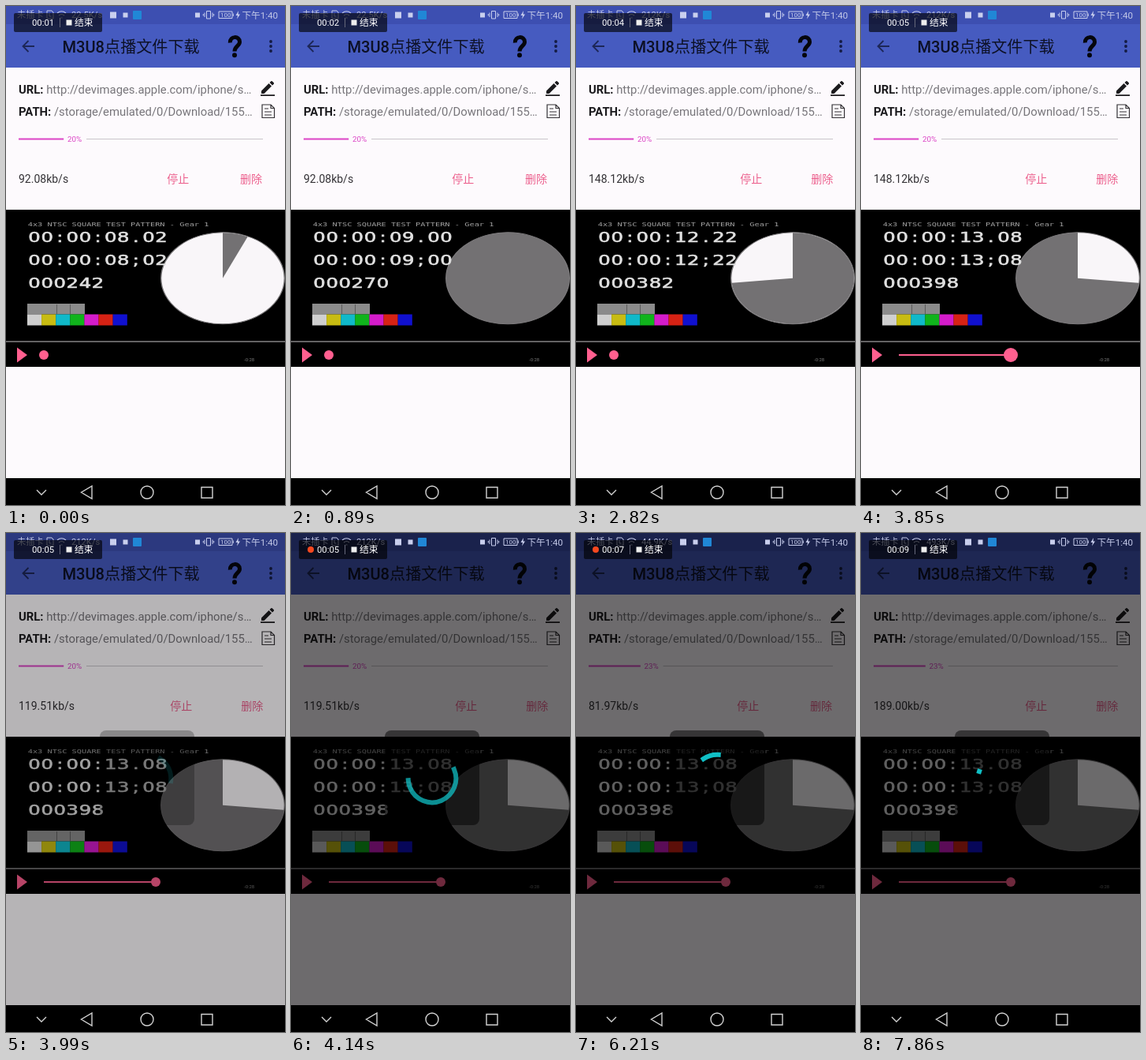
Recreate the animation shown at these times as an HTML page. Size 354 by 632 pixels, loop 8000 ms.

```html
<!DOCTYPE html>
<html lang="zh">
<head>
<meta charset="utf-8">
<style>
html, body { margin: 0; width: 100%; height: 100%; overflow: hidden; background: #fdfafd; }
svg { display: block; width: 100%; height: 100%; }
text { font-family: Roboto, "Noto Sans CJK SC", "Noto Sans CJK", sans-serif; white-space: pre; }
.field { font-size: 14.85px; fill: #77757a; }
.field tspan { font-weight: 700; fill: #1b1a1d; }
.button { font-size: 14px; font-weight: 500; fill: #ec5f8d; }
.status { font-size: 11.2px; fill: #c3c9e8; }
.digits { font: 18px "DejaVu Sans", sans-serif; fill: #e0e0e0; stroke: #e0e0e0; stroke-width: .6; text-anchor: middle; }
.caption { font: 7.65px "DejaVu Sans Mono", monospace; fill: #a0a0a0; }
.soft { filter: blur(.5px); }
.line { fill: none; stroke-width: 1.4; }
</style>
</head>
<body>
<svg viewBox="0 0 354 632">
  <rect width="354" height="632" fill="#fdfafd"/>
  <rect width="354" height="78" fill="#465bc0"/>
  <rect width="354" height="23" fill="#3d4fb1"/>

  <!-- Toolbar -->
  <path class="line" d="M36 51H21.5M28.5 44L21.5 51L28.5 58" stroke="#1d2757" style="stroke-width:1.8"/>
  <text x="71.5" y="58.5" font-size="20.1" font-weight="500" fill="#0d1126">M3U8点播文件下载</text>
  <path d="M284.3 46.5C283.8 37.5 296.5 37.5 296.5 45.5C296.5 50.5 290 51 290 57.5" fill="none" stroke="#05060c" stroke-width="5"/>
  <circle cx="290" cy="62.3" r="3" fill="#05060c"/>
  <g fill="#141b42"><circle cx="336" cy="45" r="1.9"/><circle cx="336" cy="51" r="1.9"/><circle cx="336" cy="57" r="1.9"/></g>

  <!-- Task details -->
  <text class="field" x="16" y="110.6"><tspan>URL: </tspan>http://devimages.apple.com/iphone/s…</text>
  <text class="field" x="16" y="138.6"><tspan>PATH: </tspan>/storage/emulated/0/Download/155…</text>
  <path d="M324 111V107.5L333.5 98L337 101.5L327.5 111ZM334.5 97L336.3 95.2Q337 94.7 337.7 95.2L339.8 97.3Q340.3 98 339.8 98.7L338 100.5ZM323 112.3H341V114H323Z" fill="#1b1a1d"/>
  <path class="line" d="M325 125H336L340.5 129.5V141.5H325ZM336 125V129.5H340.5M328 130H333M328 134H337M328 138H337" stroke="#333135" style="stroke-width:1.2"/>
  <path id="rest" stroke="#c9c5ca" stroke-width="1"/>
  <path id="done" stroke="#dc45c6" stroke-width="2"/>
  <text id="percent" y="171.8" font-size="9.8" fill="#dc45c6"></text>
  <text id="speed" x="16" y="223.8" font-size="14" fill="#343236"></text>
  <text id="stop" class="button" y="223.8">停止</text>
  <text id="remove" class="button" y="223.8">删除</text>

  <!-- Video, shown wider than it was shot -->
  <rect y="258" width="354" height="199" fill="#000"/>
  <g class="soft">
    <g transform="scale(1.35 1)">
      <text class="caption" x="20.5" y="278.8">4x3 NTSC SQUARE TEST PATTERN - Gear 1</text>
      <circle id="disc" cx="203.7" cy="344.8" r="58" stroke="#7b797b" stroke-width="1"/>
      <path id="wedge"/>
      <text id="code1" class="digits" y="299.4"></text>
      <text id="code2" class="digits" y="328.4"></text>
      <text id="count" class="digits" y="357.2"></text>
    </g>
    <rect x="27" y="377" width="73" height="13.5" fill="#8b8b8b"/>
    <path d="M64.5 378V390M81.5 378V390" stroke="#5c5c5c"/>
    <g id="bars"></g>
  </g>
  <path d="M0 425H354" stroke="#858385" stroke-width="1.6"/>
  <path d="M14 432.5L27 442L14 451.5Z" fill="#ff5f8f"/>
  <path id="track" stroke="#ff5f8f" stroke-width="2"/>
  <circle id="thumb" cy="442" fill="#ff5f8f"/>
  <text x="302" y="450" font-size="6" fill="#777">-0:28</text>

  <!-- Loading dialog -->
  <rect id="dim" width="354" height="598" fill="#000"/>
  <g id="dialog">
    <rect x="119" y="250" width="120" height="120" rx="8" fill-opacity=".5"/>
    <circle id="spinner" cx="179" cy="311" r="30.3" pathLength="360" fill="none" stroke="#10bfc5" stroke-width="6" stroke-linecap="square"/>
  </g>

  <!-- Status bar -->
  <text class="status" x="14" y="15.3">未插卡</text>
  <path class="line" d="M52 6H58L60 8V16H52ZM55 9V13H57.5" stroke="#c3c9e8" style="stroke-width:1"/>
  <path class="line" d="M65 9Q70.5 4.5 76 9M67 12Q70.5 9 74 12M69.5 15H71.5" stroke="#c3c9e8" style="stroke-width:1.2"/>
  <text id="net" class="status" x="83" y="15.3"></text>
  <g fill="#c9cfee">
    <rect x="132" y="7.5" width="8" height="8"/>
    <rect x="148.5" y="8.5" width="6" height="6"/>
    <rect x="240" y="8.5" width="6" height="6"/>
    <path d="M295 6L291.5 12H294L293 16.5L297 10.5H294.5Z"/>
  </g>
  <rect x="161" y="6" width="11" height="11" rx="1" fill="#2087d6"/>
  <path class="line" d="M254.5 6.5H259.5V16H254.5ZM252 8.5V14M262 8.5V14M250.3 10V12.5M263.7 10V12.5" stroke="#c9cfee" style="stroke-width:1"/>
  <path class="line" d="M270 7H287V15.5H270ZM288.3 9.5V13" stroke="#c9cfee" style="stroke-width:1"/>
  <text x="272" y="14.3" font-size="8" fill="#c9cfee">100</text>
  <text class="status" x="299.5" y="15.6" style="font-size:11.6px">下午1:40</text>

  <!-- Recorder badge -->
  <rect x="10" y="9" width="112" height="24" rx="2" fill="#000" fill-opacity=".64"/>
  <circle id="dot" cx="25" cy="21" r="4" fill="#f5481f"/>
  <text id="clock" x="33" y="25.2" font-size="11.3" fill="#fff"></text>
  <path d="M68.5 15V27" stroke="#66687a"/>
  <rect x="76.5" y="17.5" width="7" height="7" fill="#eee"/>
  <text x="87" y="25.2" font-size="11.8" fill="#fff">结束</text>

  <!-- Navigation bar -->
  <rect y="598" width="354" height="34" fill="#000"/>
  <path class="line" d="M39 613L45 619L51 613M109 608V624L95.5 616ZM248 609.5H262V623H248ZM187 616A8 8 0 1 1 171 616A8 8 0 1 1 187 616" stroke="#d2d2d2"/>
</svg>
<script>
const LOOP = 8000, TICK = 148.1;
const FPS = 30, PAUSED = 398;
const WHITE = '#f9f6f9', GREY = '#737173';

const speeds = [[0, '92.08'], [1330, '114.29'], [2220, '148.12'], [3990, '119.51'], [6000, '81.97'], [6900, '189.00']];
const rates = [[0, '22.5K/s'], [2220, '212K/s'], [5100, '44.9K/s'], [7700, '493K/s']];
const progress = [[0, 20], [5200, 23]];

const el = id => document.getElementById(id);
const set = (id, attrs) => { for (const k in attrs) el(id).setAttribute(k, attrs[k]); };
const write = (id, text) => { el(id).textContent = text; };
const pad = (n, size = 2) => String(n).padStart(size, '0');
const clamp = x => Math.min(1, Math.max(0, x));
const latest = (list, t) => list.filter(([start]) => start <= t).pop()[1];

// cubic-bezier(.4, 0, .2, 1)
function ease(x) {
  x = clamp(x);
  let lo = 0, hi = 1;
  for (let i = 0; i < 24; i++) {
    const s = (lo + hi) / 2, r = 1 - s;
    if (1.2 * s * r * r + .6 * s * s * r + s ** 3 < x) lo = s; else hi = s;
  }
  return lo * lo * (3 - 2 * lo);
}

function writeDigits(id, text) {
  write(id, text);
  set(id, { x: [...text].map((_, i) => 26.7 + 11.93 * i).join(' ') });
}

function videoFrame(t) {
  if (t < 2200) return Math.round(242 + Math.min(t, 1930) * .0319);
  return Math.min(PAUSED, Math.round(382 + (t - 2820) * FPS / 1000));
}

function drawVideo(t) {
  const n = videoFrame(t), sec = Math.floor(n / FPS), part = n % FPS;
  writeDigits('code1', `00:00:${pad(sec)}.${pad(part)}`);
  writeDigits('code2', `00:00:${pad(sec)};${pad(part)}`);
  writeDigits('count', pad(n, 6));

  const colors = sec % 2 ? [GREY, WHITE] : [WHITE, GREY];
  const a = 2 * Math.PI * part / FPS, cx = 203.7, cy = 344.8, r = 57.6;
  set('disc', { fill: colors[0] });
  set('wedge', {
    fill: colors[1],
    d: `M${cx} ${cy}V${cy - r}A${r} ${r} 0 ${+(part > FPS / 2)} 1 ${cx + r * Math.sin(a)} ${cy - r * Math.cos(a)}Z`
  });
}

function drawTask(t) {
  const p = latest(progress, t), end = 16 + p * 2.86;
  set('done', { d: `M16 168.5H${end}` });
  set('percent', { x: end + 4.8 });
  write('percent', p + '%');
  set('rest', { d: `M${end + 28.8} 168.5H326` });

  const speed = latest(speeds, t), wide = speed.length > 5;
  write('speed', speed + 'kb/s');
  set('stop', { x: wide ? 208.3 : 204.3 });
  set('remove', { x: wide ? 298.3 : 297 });
}

function drawSeek(t) {
  const x = 48 + 142 * ease((t - 3200) / 550);
  set('track', { d: `M48 442H${x}` });
  set('thumb', { cx: x, r: t > 3150 && t < 3950 ? 9 : 6 });
}

function drawDialog(t) {
  const shown = clamp((t - 3900) / 200);
  set('dim', { opacity: .57 * shown });
  set('dialog', { opacity: shown });

  const u = ((t - 4140) / 1333.3 + 10.23) % 1;
  const tail = 270 * ease(2 * u - 1), head = 270 * ease(2 * u);
  const turn = 45 + (t - 4140) * 720 / 4444;
  set('spinner', {
    opacity: clamp((t - 3900) / 330),
    'stroke-dasharray': `${head - tail + .1} 360`,
    transform: `rotate(${turn + 90 * u + tail - 90} 179 311)`
  });
}

function drawStatus(t) {
  const clock = t + 1350;
  write('net', latest(rates, t));
  write('clock', '00:' + pad(Math.floor(clock / 1000)));
  set('dot', { opacity: clock % 1000 >= 480 ? 1 : 0 });
}

el('bars').innerHTML = ['#cfcfcf', '#c8bc12', '#10b9c9', '#10b41c', '#d41cca', '#d62214', '#1010cf']
  .map((c, i) => `<rect x="${27 + 18.1 * i}" y="390.5" width="18.2" height="14" fill="${c}"/>`).join('');

function draw(now) {
  const t = Math.floor((now % LOOP) / TICK + .1) * TICK;
  for (const part of [drawVideo, drawTask, drawSeek, drawDialog, drawStatus]) part(t);
  requestAnimationFrame(() => draw(performance.now() - start));
}

const start = performance.now();
draw(0);
</script>
</body>
</html>
```
